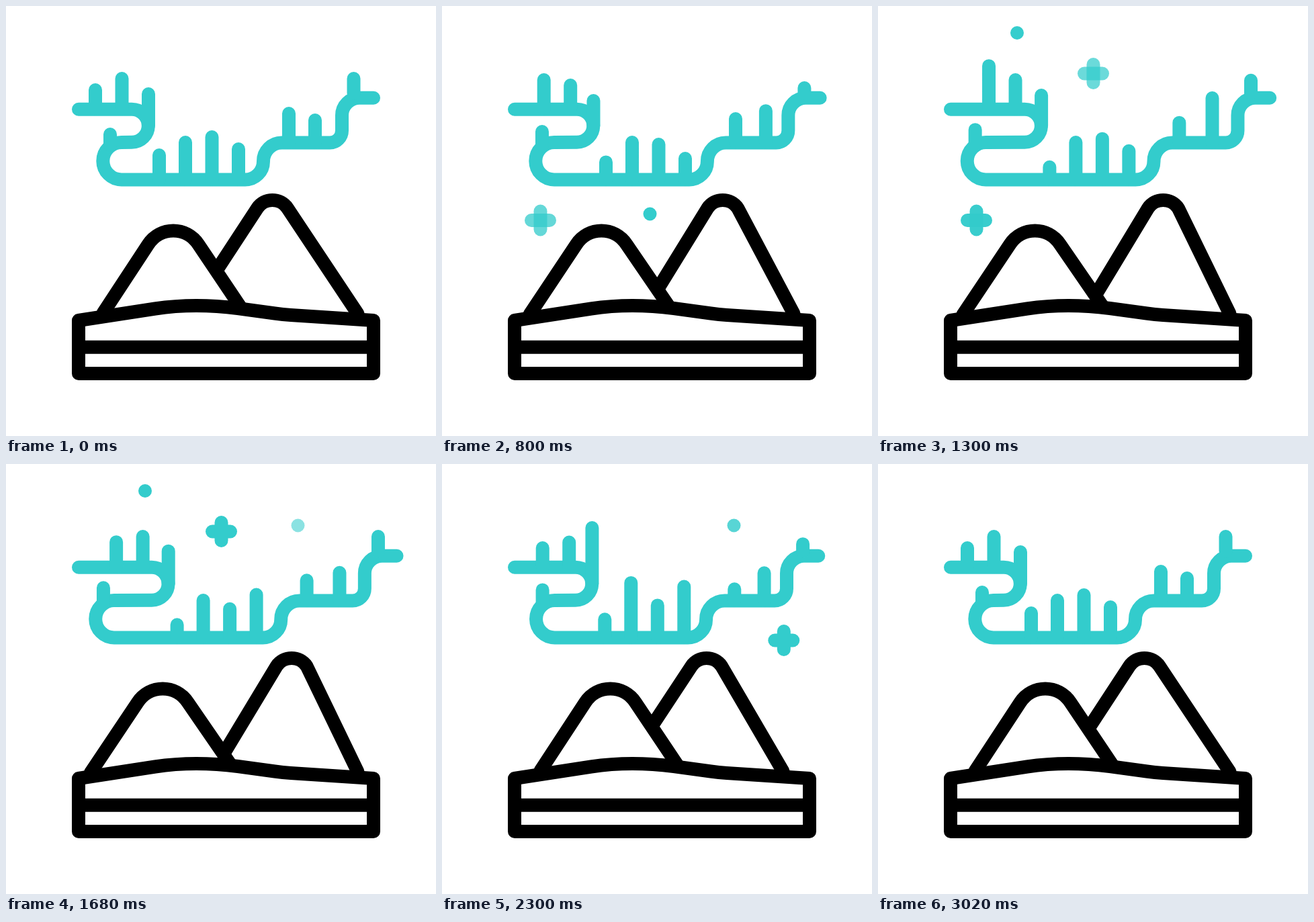
These frames come from a looping animation (640 by 640 pixels, 3100 ms). An HTML page with a canvas:

```html
<!DOCTYPE html>
<html lang="en">
<head>
<meta charset="utf-8">
<title>Northern lights</title>
<style>
html, body { margin: 0; width: 100%; height: 100%; overflow: hidden; background: #fff; }
canvas { display: block; width: 100vmin; height: 100vmin; }
</style>
</head>
<body>
<canvas width="640" height="640"></canvas>
<script>
const LOOP = 3100, START = 100, TURN = 1460, END = 3020;
const TEAL = '#33cccc', BLACK = '#000';
const ctx = document.querySelector('canvas').getContext('2d');

const clamp = x => Math.max(0, Math.min(1, x));
// Linear rise from a to peak, then fall to b.
const tent = (t, a, peak, b) => clamp(Math.min((t - a) / (peak - a), (b - t) / (b - peak)));
const hump = (...args) => {
  const u = tent(...args);
  return u * u * (3 - 2 * u);
};

// Rays: x, foot y, top y, sideways sway, sag with the drift, then [time, change] pulses.
const rays = [
  [133, 153, 125, 1.17, 0, [1200, -38]],
  [172.5, 153, 108, 1.17, 0, [360, -20], [800, 10], [2560, 21]],
  [212, 178, 131, 1.13, 0, [800, 10], [2300, -36]],
  [155, 208, 191, -0.42, -0.25],
  [228, 258, 222, 1, 0.65],
  [267, 258, 203, 1, 0, [2400, -28]],
  [306.5, 258, 195, 1, 0, [360, -20], [800, 11], [1950, 31]],
  [346, 258, 213, 1, 0, [800, 14], [2060, -42]],
  [421, 203, 160, 1, 0.5, [360, -18], [2450, 23]],
  [460, 203, 170, 1.37, 0, [1200, -35], [2560, -19]],
  [517.5, 130, 108, 1.37, 0, [800, 14], [2400, 12]]
];

// Sparkles: x, y, start time, half arm length (0 makes a dot).
const sparkles = [
  [309.5, 309.5, 144, 0],
  [146.5, 319, 530, 13.5],
  [207, 40, 945, 0],
  [320.5, 100.5, 1040, 13.5],
  [434.5, 91.5, 1476, 0],
  [508.8, 262.5, 1844, 13.5]
];

function stroke(color, build) {
  ctx.strokeStyle = color;
  ctx.beginPath();
  build();
  ctx.stroke();
}

function line(x1, y1, x2, y2) {
  ctx.moveTo(x1, y1);
  ctx.lineTo(x2, y2);
}

function pulse(t, [at, change]) {
  const reach = Math.min(700, at - START, END - at);
  return change * hump(t, at - reach, at, at + reach);
}

function aurora(t) {
  const drift = 31 * tent(t, START, TURN, END);
  const s = drift * (0.5 + 0.03 * drift);
  const hook = 0.86 * s, back = -0.32 * s, mid = 0.76 * s, step = 0.98 * s;
  stroke(TEAL, () => {
    ctx.moveTo(108, 153.7);
    ctx.lineTo(187 + hook, 153.7);
    ctx.arc(187.3 + hook, 178.2, 24.5, -Math.PI / 2, Math.PI / 2);
    ctx.lineTo(172 + back, 203);
    ctx.arc(172 + back, 230.7, 27.7, -Math.PI / 2, Math.PI / 2, true);
    ctx.lineTo(356 + mid, 258.4);
    ctx.arcTo(383 + mid, 258.4, 383 + mid, 231, 27);
    ctx.arcTo(383 + mid, 203.5, 411 + mid, 203.5, 27.5);
    ctx.arcTo(500 + step, 203.5, 500 + step, 185, 18);
    ctx.arcTo(500 + step, 136.8, 527 + step, 136.8, 26);
    ctx.lineTo(547 + s, 136.8);
  });
  stroke(TEAL, () => {
    for (const [x, foot, rest, sway, sag, ...pulses] of rays) {
      // The hook and the back bend carry their own rays.
      const px = x === 212 ? x + hook : x + sway * drift * (sway < 0 ? 0.9 : 1);
      const top = pulses.reduce((y, p) => y + pulse(t, p), rest + sag * drift);
      line(px, foot, px, top);
    }
  });
}

function sparkle([x, y, start, arm], t) {
  const age = t - start;
  ctx.globalAlpha = clamp(Math.min(age, 1120 - age) / 360);
  stroke(TEAL, () => line(x - arm, y, x + arm, y));
  if (arm) stroke(TEAL, () => line(x, y - arm, x, y + arm));
  ctx.globalAlpha = 1;
}

// Rounded peak between two shoulders.
function peak(x, half, y, lift, grip) {
  ctx.lineTo(x - half, y);
  ctx.bezierCurveTo(x - half + grip, y - lift, x + half - grip, y - lift, x + half, y);
}

function mountains(t) {
  const arch = Math.sin(Math.PI * clamp((t - START) / (END - START))) ** 0.8;
  const pull = hump(t, 1850, 2560, END);
  const far = 28.8 * arch - 35 * pull, near = -0.55 * far;
  stroke(BLACK, () => {
    ctx.moveTo(283 + 1.25 * far, 440);
    peak(396.5 + far, 22.5, 301, 16, 10.5);
    ctx.lineTo(523.5 - 23 * pull, 458 - pull);
  });
  ctx.fillStyle = '#fff';
  stroke(BLACK, () => {
    ctx.moveTo(144.5 + 1.2 * near, 457 - 0.18 * near);
    peak(249 + near, 37.5, 355, 27.3, 18);
    ctx.lineTo(349 + near, 448 + 0.14 * near);
    ctx.fill();
  });
}

function ground() {
  stroke(BLACK, () => {
    ctx.moveTo(108, 468);
    ctx.lineTo(222, 450.5);
    ctx.bezierCurveTo(262, 444.5, 305, 445, 345, 450);
    ctx.lineTo(400, 457.5);
    ctx.quadraticCurveTo(412, 459.3, 424, 460);
    ctx.lineTo(547, 468);
    ctx.lineTo(547, 547);
    ctx.lineTo(108, 547);
    ctx.closePath();
    line(108, 507.7, 547, 507.7);
  });
}

function draw() {
  const t = performance.now() % LOOP;
  ctx.fillStyle = '#fff';
  ctx.fillRect(0, 0, 640, 640);
  ctx.lineWidth = 20;
  ctx.lineCap = ctx.lineJoin = 'round';
  aurora(t);
  sparkles.forEach(s => sparkle(s, t));
  mountains(t);
  ground();
  requestAnimationFrame(draw);
}
draw();
</script>
</body>
</html>
```
